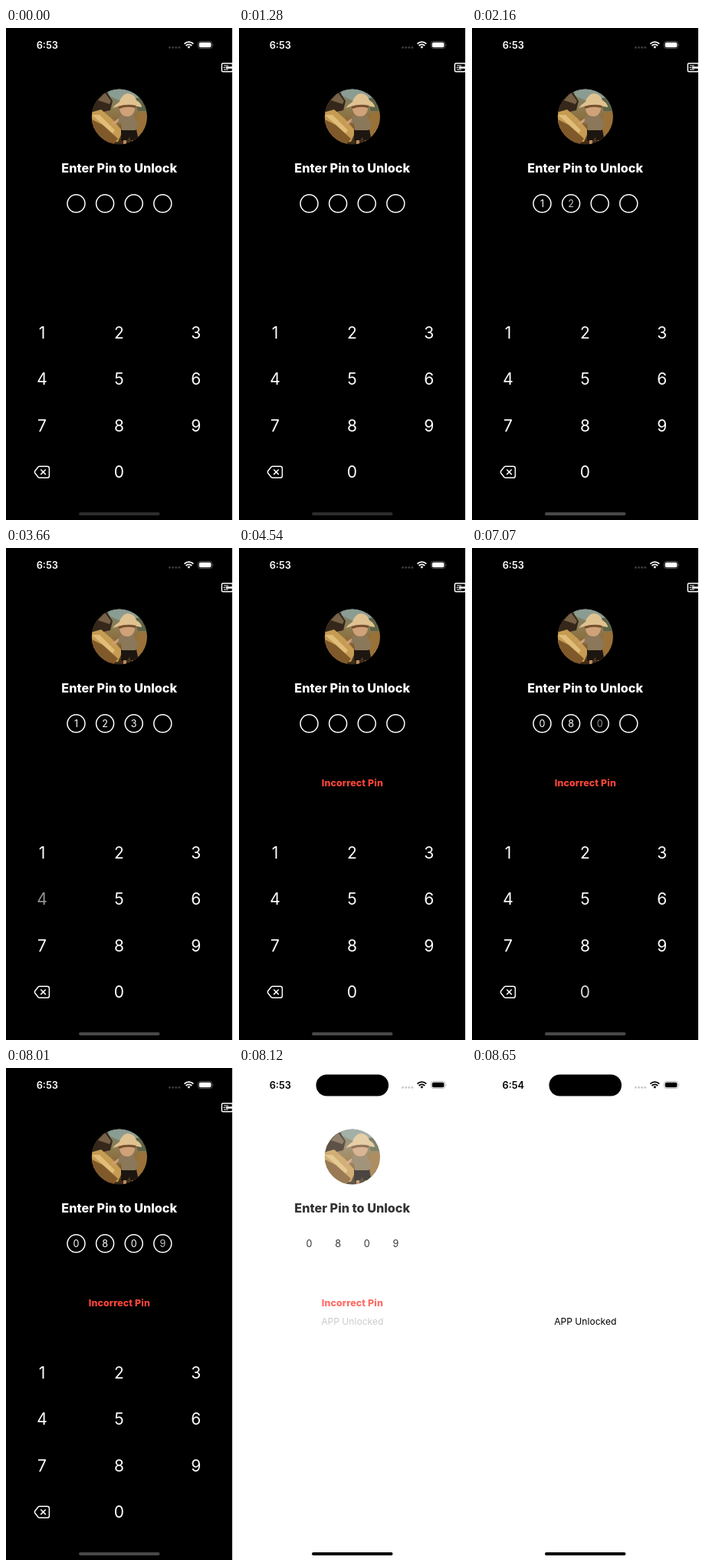
These frames come from a looping animation (296 by 640 pixels, 8.93 s). An HTML page:

```html
<!DOCTYPE html>
<html lang="en">
<head>
<meta charset="utf-8">
<title>Pin lock</title>
<style>
  html, body { margin: 0; width: 100%; height: 100%; overflow: hidden; }
  svg { display: block; width: 100%; height: 100%; font-family: Inter, "Liberation Sans", sans-serif;
        background: #000; color: #fff; --dots: #383838; --rim: #666; }
  svg.light { background: #fff; color: #000; --dots: #ccc; --rim: #aaa; }
  text { fill: currentColor; text-anchor: middle; }
  .light .white { display: none; }
  .line { fill: none; stroke: #fff; stroke-width: 1.5; stroke-linecap: round; stroke-linejoin: round; }
  .key { font-size: 21px; }
  .digit { font-size: 12.6px; }
</style>
</head>
<body>
<svg id="stage" viewBox="0 0 296 640">
  <defs>
    <clipPath id="round"><circle cx="147.8" cy="115.4" r="36"/></clipPath>
    <linearGradient id="scene" x2="0" y2="1">
      <stop offset="0" stop-color="#71847c"/>
      <stop offset=".35" stop-color="#8d7b51"/>
      <stop offset=".6" stop-color="#8a6835"/>
      <stop offset="1" stop-color="#2f2010"/>
    </linearGradient>
  </defs>

  <rect x="100.5" y="8.5" width="94.5" height="28" rx="14"/>
  <text id="clock" x="53.8" y="26.6" font-size="12.8" font-weight="600"></text>
  <g fill="var(--dots)">
    <circle cx="213.5" cy="25.2" r="1.5"/><circle cx="217.6" cy="25.2" r="1.5"/>
    <circle cx="221.7" cy="25.2" r="1.5"/><circle cx="225.8" cy="25.2" r="1.5"/>
  </g>
  <g fill="none" stroke="currentColor" stroke-width="1.8">
    <path d="M232.5 20.6a8.4 8.4 0 0 1 11.8 0M234.6 23a5.4 5.4 0 0 1 7.6 0"/>
    <path d="M236.5 24.5a2.8 2.8 0 0 1 3.8 0L238.4 26.7z" fill="currentColor" stroke="none"/>
  </g>
  <rect x="250.5" y="17.4" width="18.2" height="9.2" rx="3" fill="none" stroke="var(--rim)" stroke-width=".8"/>
  <rect x="251.8" y="18.7" width="15.6" height="6.6" rx="1.8" fill="currentColor"/>
  <path d="M269.8 20.4q1.6 1.6 0 3.2z" fill="var(--rim)"/>
  <rect id="bar" x="95" y="630" width="105.5" height="4" rx="2"/>

  <g id="lock">
    <g clip-path="url(#round)">
      <path d="M110 78h76v76h-76z" fill="url(#scene)"/>
      <path d="M134 78h52v24l-12-7-20 2-20-9z" fill="#8b9c92"/>
      <path d="M166 92l20-4v20h-14z" fill="#5d6347"/>
      <path d="M110 106l8-16 12-9 9 14-3 12-26 6z" fill="#35271a"/>
      <path d="M120 94l9-10 8 11-2 4z" fill="#776247"/>
      <path d="M110 110l14-4 14 12 14 16-6 14-36 2z" fill="#c69b52"/>
      <path d="M110 118l16 8 20 18-8 10-28 0z" fill="#80592a"/>
      <path d="M112 113l10 0 20 20-3 4z" fill="#e0bd78"/>
      <path d="M171 112l15-4v38l-20 4z" fill="#9a7138"/>
      <path d="M148 119l-9 6" stroke="#cf9e74" stroke-width="3.5"/>
      <path d="M150 132h20l2 10-3 5h-6l-2-5-4 5h-7z" fill="#1d1610"/>
      <path d="M153 146h4v5h-4zM164 146h4v4h-4z" fill="#b98a62"/>
      <path d="M148 114q10-5 19 0l6 12-4 7h-18l-1-9-4 0z" fill="#8b785a"/>
      <path d="M148 101h20v5q-2 9-10 9t-10-9z" fill="#d0a27a"/>
      <path d="M139 104q3-4 9-8 3-10 11-11 9 1 11 9 7 4 7 9-9-2-18-2-11 0-20 3z" fill="#e0c291"/>
      <path d="M146 102q12-4 24-1l-2 3q-10-3-20 1z" fill="#775230"/>
    </g>
    <text x="147.7" y="188.1" font-size="16.2" font-weight="800">Enter Pin to Unlock</text>
    <g id="pins"></g>
    <text id="error" x="147.9" y="309.9" font-size="12.4" font-weight="800" letter-spacing=".15" style="fill:#ff453a">Incorrect Pin</text>
    <g id="keys" class="white">
      <path class="line" d="M43.6 570.2h10.2q2.6 0 2.6 2.6v9.6q0 2.6-2.6 2.6h-10.2q-.9 0-1.6-.8l-4.2-5.2q-1-1.4 0-2.8l4.2-5.2q.7-.8 1.6-.8zM45.7 574.8l5.6 5.6M51.3 574.8l-5.6 5.6"/>
    </g>
    <g class="white">
      <rect class="line" x="281.4" y="46" width="14" height="10.8" rx="1.5"/>
      <path d="M284 48.6h6v1h-6zM283.5 51h3v1h-3zM287 50.3h8v2.4h-8zM284 53.5h6v1h-6z" fill="#fff"/>
    </g>
  </g>
  <text id="done" x="147.8" y="334.2" font-size="12.1">APP Unlocked</text>
  <path d="M295 0h1v640h-1z" fill="#fff"/>
</svg>
<script>
const $ = id => document.getElementById(id);
const LOOP = 8930, CLEAR = 4150, UNLOCK = 8011, MINUTE = 8650;
// Taps as [time, key]
const taps = [[1285, 1], [1800, 2], [2640, 3], [3630, 4],
              [5470, 0], [6150, 8], [6760, 0], [7650, 9]];

function add(parent, tag, attrs, text = '') {
  const el = document.createElementNS('http://www.w3.org/2000/svg', tag);
  for (const name in attrs) el.setAttribute(name, attrs[name]);
  el.textContent = text;
  return $(parent).appendChild(el);
}

const keys = [], digits = [];
for (let n = 0; n < 10; n++) {
  const col = n ? (n - 1) % 3 : 1, row = n ? Math.floor((n - 1) / 3) : 3;
  keys[n] = add('keys', 'text', { class: 'key', x: 47 + col * 100.4, y: 403.7 + row * 60.5 }, n);
}
for (let i = 0; i < 4; i++) {
  const x = 91.5 + i * 37.6;
  add('pins', 'circle', { class: 'line white', cx: x, cy: 228.3, r: 11.5 });
  digits[i] = add('pins', 'text', { class: 'digit', x, y: 232.9 });
}

// Smooth 0..1 ramp beginning at start
function ease(t, start, length) {
  const p = Math.min(1, Math.max(0, (t - start) / length));
  return p * p * (3 - 2 * p);
}

function draw(now) {
  const t = now % LOOP;
  const round = t < 5000 ? 0 : 4;
  const wiped = round ? 0 : ease(t, CLEAR, 330);

  digits.forEach((el, i) => {
    const [start, n] = taps[round + i];
    el.textContent = n;
    el.style.opacity = ease(t, start + 120, 350) * (1 - wiped);
  });
  keys.forEach((el, n) => {
    let dim = 0;
    for (const [start, key] of taps)
      if (key === n) dim += ease(t, start, 60) - ease(t, start + 130, 250);
    el.style.opacity = 1 - 0.8 * dim;
  });

  const open = ease(t, UNLOCK, 380);
  const grey = 44 + 28 * ease(t, taps[0][0], 400);
  $('stage').classList.toggle('light', t > UNLOCK);
  $('bar').style.fill = t > UNLOCK ? '#000' : `rgb(${grey}, ${grey}, ${grey})`;
  $('error').style.opacity = ease(t, CLEAR, 400);
  $('lock').style.opacity = 1 - open;
  $('done').style.opacity = open;
  $('clock').textContent = t < MINUTE ? '6:53' : '6:54';
}

function tick() {
  draw(performance.now());
  requestAnimationFrame(tick);
}
tick();
</script>
</body>
</html>
```
